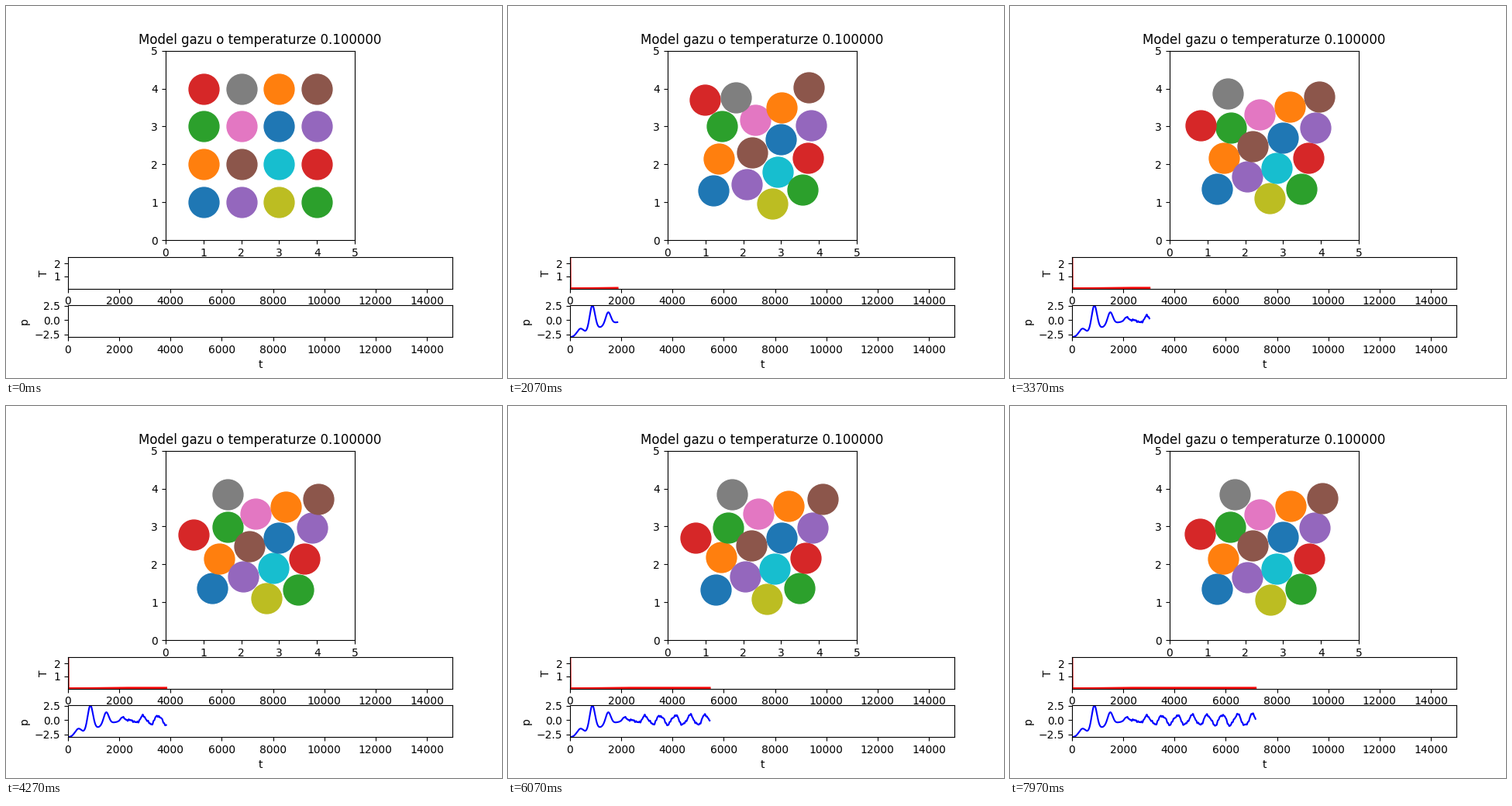
Write a matplotlib script that moves like this. It is 640 px wide and 480 px high and loops after 8 s.

```python
import numpy as np
import matplotlib.pyplot as plt
from matplotlib.animation import FuncAnimation

FRAMES = 240
STEP = 30  # simulated time per frame
T_MAX = 15000
UNIT, LEFT, BASE = 48.92, 205.7, 302.2  # box scale and corner in pixels


def ramp(t, a, b):
    return np.clip((t - a) / (b - a), 0, 1)


def bump(t, centre, width):
    return np.exp(-0.5 * ((t - centre) / width) ** 2)


def glide(t, ts, ys):
    """Smooth curve through the rows of ys without overshoot."""
    ts = np.asarray(ts, float)
    h = np.diff(ts)[:, None]
    d = np.diff(ys, axis=0) / h
    a, b = d[:-1], d[1:]
    m = np.zeros_like(ys)
    same = a * b > 0
    m[1:-1] = np.where(same, 2 * a * b / np.where(same, a + b, 1), 0)
    i = np.clip(np.searchsorted(ts, t, "right") - 1, 0, len(ts) - 2)
    s = ((t - ts[i]) / h[i, 0])[:, None]
    return (ys[i] * (1 + 2 * s) * (1 - s) ** 2 + ys[i + 1] * s * s * (3 - 2 * s)
            + h[i] * (m[i] * s * (1 - s) ** 2 - m[i + 1] * s * s * (1 - s)))


def lattice(feet, step, bow=0, loose=()):
    """Four leaning columns of discs; loose ones (red, grey, brown) sit apart."""
    j = np.arange(4)
    pose = np.array(feet)[:, None] + step * j + bow * np.sin(np.pi * j / 3)
    pose = pose.ravel()
    if loose:
        pose[[3, 7, 15]] = loose
    return pose


# Poses as complex pixel positions: x + y * 1j.
grid = lattice(LEFT + UNIT * np.arange(1, 5) + (BASE - UNIT) * 1j, -UNIT * 1j)
squeezed = lattice([264+243j, 303+238j, 343+243j, 382+237j], -41j, 10,
                   [256+120j, 298+117j, 394+115j])
rebound = lattice([265+238j, 308+230j, 341+255j, 380+237j], 4-41.3j, 4,
                  [254+121j, 294+118j, 388+105j])
feet, lean = [267+236j, 305+220j, 335+249j, 376+236j], 8.8-39.8j
packed = lattice(feet, lean, loose=[246+155j, 281+113j, 399+116j])
drifted = lattice(feet, lean, loose=[242+172j, 289+113j, 406+120j])
final = lattice(feet, lean, loose=[245+166j, 290+115j, 403+118j])

frames = np.arange(FRAMES)
poses = np.array([grid, squeezed, rebound, packed, drifted, final])
path = glide(frames, [0, 37, 62, 101, 155, 239],
             np.hstack([poses.real, poses.imag]))

# Thermal trembling once the discs are packed.
rng = np.random.default_rng(4)
rate, phase = rng.uniform(0.12, 0.3, 32), rng.uniform(0, 2 * np.pi, 32)
path += ramp(frames, 62, 130)[:, None] * np.sin(frames[:, None] * rate + phase)
xs, ys = (path[:, :16] - LEFT) / UNIT, (BASE - path[:, 16:]) / UNIT

# Pressure: opening swings, then a growing ripple.
time = np.arange(0, STEP * FRAMES, 10)
pressure = (-3 * np.exp(-(time / 1300) ** 2)
            + 1.2 * bump(time, 400, 130) + 4.45 * bump(time, 870, 105)
            + 2.15 * bump(time, 1490, 100) + 0.7 * bump(time, 2130, 80))
ripple = ((0.5 + time / 14000) * np.cos(2 * np.pi * (time - 2930) / 588)
          + 0.15 * np.sin(time / 41))
pressure += ramp(time, 2300, 2900) * ripple
pressure += ramp(time, 1900, 2300) * 0.07 * (np.sin(time / 11) + np.sin(time / 17))
temperature = 0.065 + 0.04 * ramp(time, 600, 2100)
temperature[0] = 3  # drops at once from a high first value

fig = plt.figure(figsize=(6.4, 4.8), dpi=100)
box, ax_t, ax_p = fig.subplots(3, 1, gridspec_kw={"height_ratios": [6, 1, 1]})

box.set(xlim=(0, 5), ylim=(0, 5), aspect="equal",
        xticks=range(6), yticks=range(6))
box.set_title("Model gazu o temperaturze 0.100000")
ax_t.set(xlim=(0, T_MAX), ylim=(0.05, 2.5), yticks=[1, 2], ylabel="T")
ax_p.set(xlim=(0, T_MAX), ylim=(-3, 2.53), yticks=[-2.5, 0, 2.5],
         xlabel="t", ylabel="p")
for ax in (ax_t, ax_p):
    ax.set_xticks(range(0, T_MAX, 2000))

discs = [box.plot([], [], "o", ms=28, color=f"C{k % 10}")[0] for k in range(16)]
t_line, = ax_t.plot([], [], "r", lw=2)
p_line, = ax_p.plot([], [], "b", lw=1.5)


def draw(frame):
    for disc, x, y in zip(discs, xs[frame], ys[frame]):
        disc.set_data([x], [y])
    n = frame * STEP // 10
    t_line.set_data(time[:n], temperature[:n])
    p_line.set_data(time[:n], pressure[:n])
    return [*discs, t_line, p_line]


anim = FuncAnimation(fig, draw, frames=FRAMES, interval=8000 / FRAMES,
                     repeat=True, repeat_delay=0)
plt.show()
```
